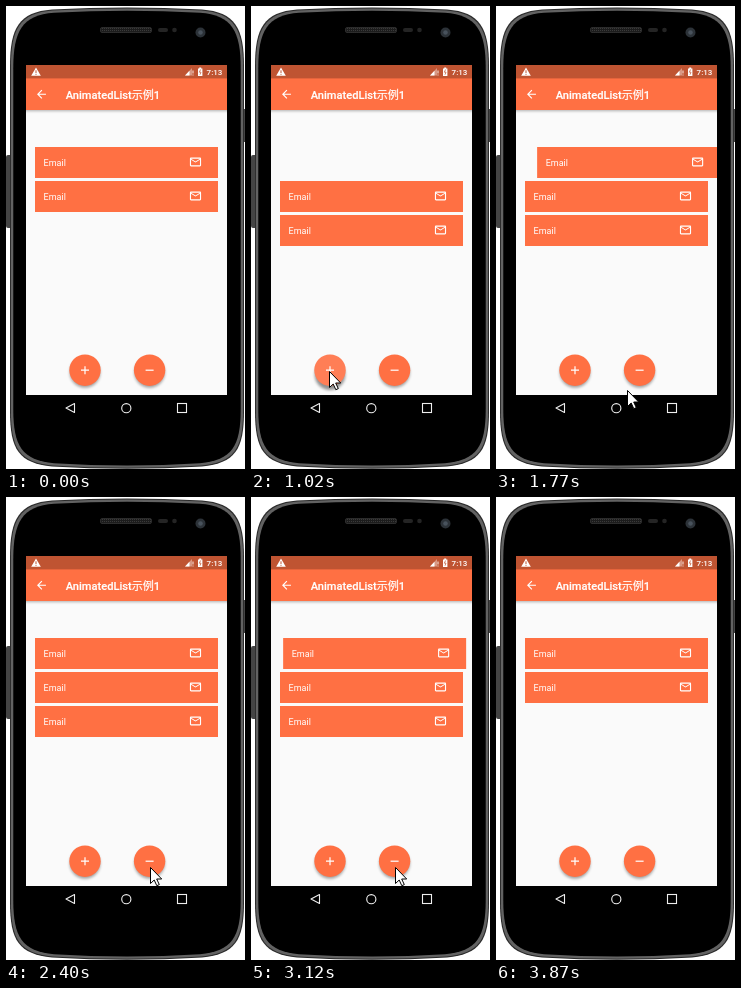
Recreate the animation shown at these times as an HTML page. Size 239 by 463 pixels, loop 4.62 s.

```html
<!DOCTYPE html>
<html lang="en">
<head>
<meta charset="utf-8">
<title>Animated list</title>
<style>
  html, body { margin: 0; width: 100%; height: 100%; overflow: hidden; background: #fff; }
  svg { display: block; width: 239px; height: 463px; }
  text { font-family: Roboto, "Noto Sans CJK SC", "Noto Sans CJK", sans-serif; fill: #fff; }
</style>
</head>
<body>
<svg viewBox="0 0 239 463">
  <defs>
    <clipPath id="screen"><rect x="20" y="59" width="201" height="330"/></clipPath>
    <filter id="blur" x="-50%" y="-50%" width="200%" height="200%"><feGaussianBlur stdDeviation="1.7"/></filter>
    <pattern id="mesh" width="2" height="2" patternUnits="userSpaceOnUse">
      <rect width="2" height="2" fill="#1c1c1c"/><rect width="1" height="1" fill="#3a3a3a"/>
    </pattern>
    <path id="body" d="M4 60C4 22 13 6 46 3.500Q121 -.5 196 3.500C229 6 238 22 238 60V405C238 444 229 457 196 460.500Q121 465 46 460.500C13 457 4 444 4 405Z"/>
    <g id="tile">
      <rect x="29" y="141" width="183" height="31" fill="#ff7043"/>
      <text x="37.600" y="159.500" font-size="9">Email</text>
      <path transform="translate(182.8 149.3) scale(.558)" fill="#fff" d="M20 4H4c-1.1 0-2 .9-2 2v12c0 1.1.9 2 2 2h16c1.1 0 2-.9 2-2V6c0-1.1-.9-2-2-2zm0 14H4V8l8 5 8-5v10zm-8-7L4 6h16l-8 5z"/>
    </g>
  </defs>

  <!-- phone body: dark edge, grey rim, black face -->
  <rect x="0" y="149" width="6" height="73" rx="2" fill="#444"/>
  <rect x="235" y="103" width="6" height="33" rx="2" fill="#444"/>
  <use href="#body" fill="#2a2a2a"/>
  <use href="#body" fill="#626262" transform="translate(121 232) scale(.992 .996) translate(-121 -232)"/>
  <use href="#body" fill="#000" transform="translate(121 232) scale(.972 .986) translate(-121 -232)"/>
  <rect x="94.500" y="21.500" width="51" height="5" rx="1.500" fill="url(#mesh)" stroke="#333" stroke-width=".8"/>
  <g fill="#242424"><rect x="152" y="22" width="10" height="4" rx="2"/><circle cx="168.500" cy="24" r="2.300"/></g>
  <circle cx="194.500" cy="26.500" r="5" fill="#2c3238"/>
  <circle cx="194.500" cy="26.500" r="2.300" fill="#48525c"/>

  <g clip-path="url(#screen)">
    <rect x="20" y="59" width="201" height="330" fill="#fafafa"/>
    <use href="#tile" class="row"/>
    <use href="#tile" class="row"/>
    <use href="#tile" id="fresh"/>

    <rect x="15" y="74" width="211" height="31" fill="#000" opacity=".3" filter="url(#blur)"/>
    <rect x="20" y="72" width="201" height="32" fill="#ff7043"/>
    <rect x="20" y="59" width="201" height="13.400" fill="#bf5432"/>
    <path d="M30 61.500L34.800 69.800H25.200Z" fill="#fff"/>
    <path d="M30 64.300v2.700m0 .8v1" stroke="#bf5432"/>
    <path d="M179 69.500L186 62V69.500Z" fill="#fff" opacity=".4"/>
    <path d="M179 69.500L183.500 64.700V69.500Z" fill="#fff"/>
    <path d="M187 64.500v3m0 1v1" stroke="#fff" stroke-width=".9"/>
    <path d="M192 62.500h1.200v-1h2v1h1.200v7.500H192Z" fill="#fff"/>
    <path d="M194.600 63.500l-1.300 2.700h1.700l-1 2.500" fill="none" stroke="#bf5432" stroke-width=".7"/>
    <text x="200.600" y="68.900" font-size="8" font-weight="500">7:13</text>
    <path transform="translate(28.8 81.6) scale(.558)" fill="#fff" d="M20 11H7.830l5.590-5.590L12 4l-8 8 8 8 1.410-1.410L7.830 13H20v-2z"/>
    <text x="59.700" y="92.500" font-size="11.100" font-weight="500" stroke="#fff" stroke-width=".2">AnimatedList示例1</text>

    <g id="fabs"></g>
  </g>

  <g fill="none" stroke="#eee" stroke-width="1.100">
    <path d="M68.500 397.500V406.500L60 402Z" stroke-linejoin="round"/>
    <circle cx="120.300" cy="402.200" r="4.600"/>
    <rect x="171.500" y="397.500" width="9" height="9"/>
  </g>
  <path id="cursor" d="M.5 .5V16.500L4.200 13L6.800 18.700L9.300 17.600L6.700 12H11.700Z" fill="#fff" stroke="#000" stroke-width="1"/>
</svg>
<script>
const LOOP = 4620, SLIDE = 201, PITCH = 34;
const INSERT = { jump: 1005, start: 1050, length: 900 };
const REMOVE = { start: 3079, end: 3720 };

// time, x, y of the pointer tip
const path = [
  [60, 230, 48], [180, 205, 130], [300, 150, 270], [390, 90, 390], [450, 57, 406],
  [510, 52, 394], [570, 59, 372], [660, 70, 367], [750, 78, 365], [1080, 78, 365],
  [1350, 131, 384], [2070, 131, 384], [2250, 138, 377], [2400, 144, 370],
  [3200, 144, 370], [3360, 160, 345], [3540, 190, 290], [3720, 219, 231], [3870, 240, 204]
];

const $ = id => document.getElementById(id);
const ramp = (t, a, b) => Math.min(1, Math.max(0, (t - a) / (b - a)));
const place = (el, x, y) => el.setAttribute("transform", `translate(${x} ${y})`);

function bounceOut(t) {
  const k = 7.5625, d = 2.75;
  if (t < 1 / d) return k * t * t;
  if (t < 2 / d) return k * (t - 1.5 / d) ** 2 + 0.75;
  if (t < 2.5 / d) return k * (t - 2.25 / d) ** 2 + 0.9375;
  return k * (t - 2.625 / d) ** 2 + 0.984375;
}

// Returns an update function; a press lifts the shadow and lightens the disc.
function makeFab(x, icon, [down, held, up, gone]) {
  const g = document.createElementNS("http://www.w3.org/2000/svg", "g");
  g.innerHTML = `<circle r="15.2" fill="#000" filter="url(#blur)"/>
    <circle r="15.7" fill="#ff7043"/><circle r="15.7" fill="#fff"/>
    <path d="${icon}" stroke="#fff" stroke-width="1.2"/>`;
  place(g, x, 364.2);
  $("fabs").append(g);
  const [shadow, , glow] = g.children;
  return t => {
    const level = ramp(t, down, held) * (1 - ramp(t, up, gone));
    shadow.setAttribute("cy", 2.3 + 2.2 * level);
    shadow.setAttribute("opacity", 0.36 + 0.06 * level);
    glow.setAttribute("opacity", 0.1 * level);
  };
}

const fabs = [
  makeFab(79, "M-4 0H4M0-4V4", [975, 1020, 1080, 1260]),
  makeFab(143.6, "M-4 0H4", [2650, 2760, 2950, 3120])
];

function progress(t) {
  if (t < REMOVE.start) return ramp(t, INSERT.start, INSERT.start + INSERT.length);
  const s = ramp(t, REMOVE.start, REMOVE.end);
  return 1 - 0.7 * s - 0.3 * s * s;
}

function drawCursor(t) {
  const next = path.findIndex(p => p[0] > t);
  const visible = next > 0;
  $("cursor").style.display = visible ? "" : "none";
  if (!visible) return;
  const [t0, x0, y0] = path[next - 1], [t1, x1, y1] = path[next];
  const f = ramp(t, t0, t1);
  place($("cursor"), Math.round(x0 + (x1 - x0) * f), Math.round(y0 + (y1 - y0) * f));
}

function draw(now) {
  const t = now % LOOP;
  const open = t >= INSERT.jump && t < REMOVE.end;
  document.querySelectorAll(".row").forEach((row, i) => place(row, 0, PITCH * (i + open)));
  $("fresh").style.display = open ? "" : "none";
  place($("fresh"), SLIDE * (1 - bounceOut(progress(t))), 0);
  fabs.forEach(update => update(t));
  drawCursor(t);
}

const begin = performance.now();
(function tick() {
  draw(performance.now() - begin);
  requestAnimationFrame(tick);
})();
</script>
</body>
</html>
```
